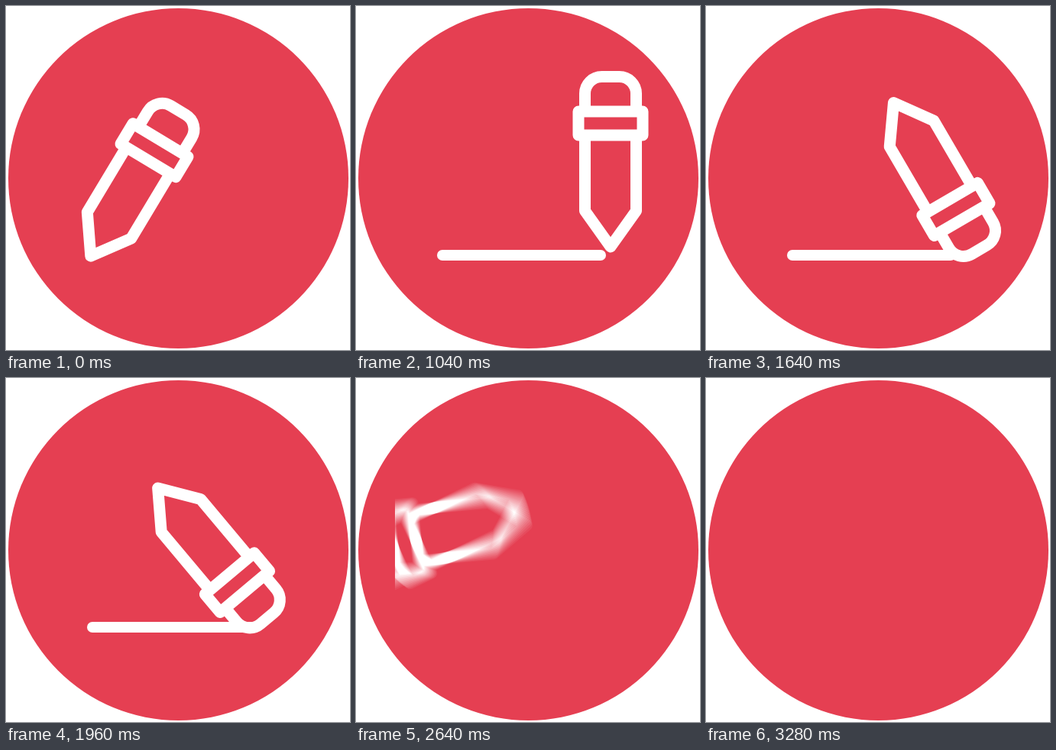
These frames come from a looping animation (450 px wide and 450 px high, 3.32 s). An HTML page with a canvas:

```html
<!DOCTYPE html>
<html>
<head>
<meta charset="utf-8">
<style>
html, body { margin: 0; width: 100%; height: 100%; overflow: hidden; background: #fff; }
canvas { display: block; }
</style>
</head>
<body>
<canvas id="stage" width="450" height="450"></canvas>
<script>
const LOOP = 3320, STEP = 40, SAMPLES = 15;
const ctx = document.getElementById('stage').getContext('2d');
const layer = document.createElement('canvas');
layer.width = layer.height = 450;
const ink = layer.getContext('2d');

// time, centre x, centre y, clockwise angle in degrees
const KEYS = [
  [0, 168, 232, 31],
  [560, 281, 220, 19],
  [960, 326, 214, 4],
  [1040, 333, 204, 0],
  [1360, 338, 201, 110],
  [1520, 312, 214, 146],
  [1680, 298, 224, 150],
  [1960, 270, 229, 140],
  [2240, 185, 222, 164],
  [2420, 118, 213, 180],
  [2640, 112, 202, 254],
  [2800, 125, 215, 335],
  [2960, 112, 240, 380],
  [3280, -60, 285, 391]
];

// Pencil around its centre, tip pointing down
const pencil = new Path2D();
pencil.moveTo(-33.5, -35);
pencil.lineTo(-33.5, 64);
pencil.lineTo(0, 111);
pencil.lineTo(33.5, 64);
pencil.lineTo(33.5, -35);
pencil.rect(-42, -66, 84, 31);
pencil.moveTo(-33.5, -66);
pencil.arcTo(-33.5, -111.5, 0, -111.5, 22);
pencil.arcTo(33.5, -111.5, 33.5, -66, 22);
pencil.lineTo(33.5, -66);

const secant = (i, c) => (KEYS[i + 1][c] - KEYS[i][c]) / (KEYS[i + 1][0] - KEYS[i][0]);

// Monotone slope: flat at turning points
function slope(i, c) {
  if (i === 0) return secant(0, c);
  if (i === KEYS.length - 1) return secant(i - 1, c);
  const a = secant(i - 1, c), b = secant(i, c);
  return a * b <= 0 ? 0 : 2 * a * b / (a + b);
}

function pose(t) {
  t = Math.max(0, Math.min(3280, t));
  let i = 0;
  while (i < KEYS.length - 2 && t >= KEYS[i + 1][0]) i++;
  const start = KEYS[i], end = KEYS[i + 1], span = end[0] - start[0];
  const s = (t - start[0]) / span, u = 1 - s;
  const [x, y, deg] = [1, 2, 3].map(c =>
    start[c] * (1 + 2 * s) * u * u + end[c] * s * s * (3 - 2 * s) +
    span * s * u * (slope(i, c) * u - slope(i + 1, c) * s));
  return { x, y, angle: deg * Math.PI / 180 };
}

function drawPencil(t) {
  const p = pose(t);
  ink.save();
  ink.translate(p.x, p.y);
  ink.rotate(p.angle);
  ink.stroke(pencil);
  ink.restore();
}

function lineEnd(t) {
  const p = pose(t), reach = 111 * Math.sin(p.angle);
  if (t < 960) return p.x - reach;
  if (t < 1700) return 320;
  return t < 2420 ? p.x + reach : 0;
}

function draw(t) {
  ctx.clearRect(0, 0, 450, 450);
  ctx.fillStyle = '#e53f52';
  ctx.beginPath();
  ctx.arc(225.5, 225.5, 222.5, 0, 2 * Math.PI);
  ctx.fill();

  const end = Math.min(320, lineEnd(t));
  ctx.strokeStyle = '#fff';
  ctx.lineWidth = 14;
  ctx.lineCap = 'round';
  if (end > 113) {
    ctx.beginPath();
    ctx.moveTo(113, 326);
    ctx.lineTo(end, 326);
    ctx.stroke();
  }

  ink.clearRect(0, 0, 450, 450);
  ink.strokeStyle = '#fff';
  ink.lineWidth = 15;
  ink.lineJoin = ink.lineCap = 'round';
  ink.globalCompositeOperation = 'lighter';
  // Only the fast flips are motion-blurred
  const flipping = (t > 1060 && t < 1600) || t > 2440;
  const n = flipping ? SAMPLES : 1;
  ink.globalAlpha = 1 / n;
  for (let k = 0; k < n; k++) drawPencil(t + (n > 1 ? (k / (n - 1) - 0.5) * 48 : 0));
  ctx.drawImage(layer, 51, 51, 348, 348, 51, 51, 348, 348);
}

const origin = performance.now();
function tick() {
  const t = (performance.now() - origin) % LOOP;
  draw(Math.floor(t / STEP) * STEP);
  requestAnimationFrame(tick);
}
tick();
</script>
</body>
</html>
```
